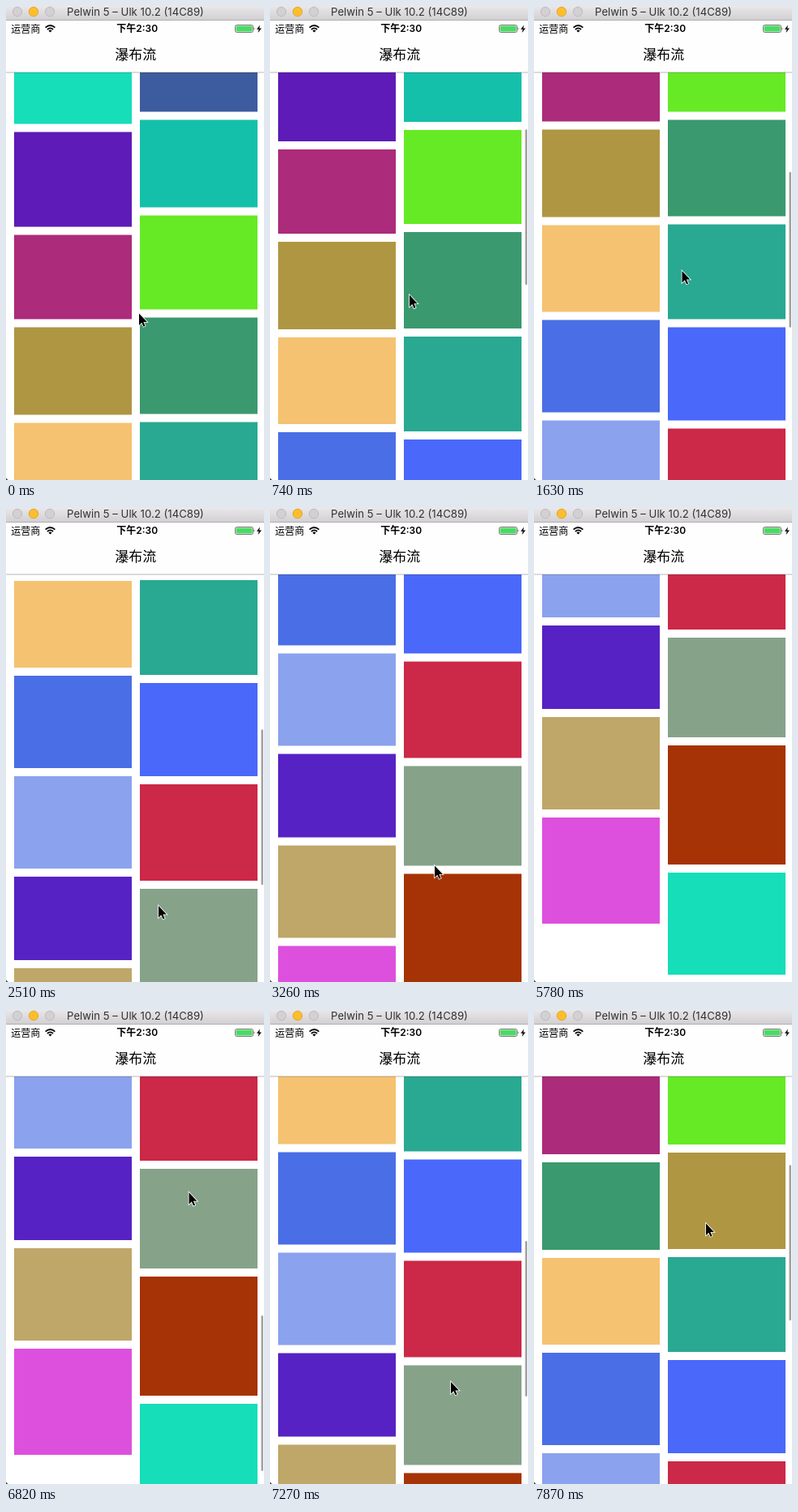
Recreate the animation shown at these times as an HTML page. Size 318 by 585 pixels, loop 8 s.

```html
<!DOCTYPE html>
<html lang="zh">
<head>
<meta charset="utf-8">
<style>
html, body { margin: 0; width: 318px; height: 585px; overflow: hidden; background: #fff; }
svg { display: block; }
text { font-family: Inter, "Noto Sans CJK SC", "Noto Sans CJK", sans-serif; text-anchor: middle; }
</style>
</head>
<body>
<svg width="318" height="585" viewBox="0 0 318 585">
  <defs>
    <linearGradient id="chrome" x2="0" y2="1">
      <stop stop-color="#e9e7e9"/><stop offset="1" stop-color="#d1cfd1"/>
    </linearGradient>
    <clipPath id="view"><rect y="82" width="318" height="503"/></clipPath>
  </defs>
  <rect width="318" height="585" fill="#fff"/>
  <g clip-path="url(#view)"><g id="tiles"></g></g>
  <rect id="bar" x="314.5" width="2.5" height="192" rx="1.25" fill-opacity=".37"/>

  <rect y="18" width="318" height="64" fill="#fefefe"/>
  <rect y="81.5" width="318" height="1" fill-opacity=".28"/>
  <rect width="318" height="17.5" fill="url(#chrome)"/>
  <rect y="17" width="318" height="1" fill="#b1afb1"/>
  <circle cx="14" cy="7" r="5.7" fill="#d2d0d2" stroke="#bebcbe"/>
  <circle cx="34" cy="7" r="5.7" fill="#fdbe2e" stroke="#e3a72c"/>
  <circle cx="54" cy="7" r="5.7" fill="#d2d0d2" stroke="#bebcbe"/>
  <text x="159.5" y="12" font-size="13.2" fill="#333">Pelwin 5 – Ulk 10.2 (14C89)</text>

  <text x="24.3" y="32.5" font-size="12">运营商</text>
  <text x="161.7" y="32.3" font-size="12" font-weight="600">下午2:30</text>
  <text x="159.7" y="66" font-size="17" font-weight="500">瀑布流</text>
  <g fill="none" stroke="#000" stroke-width="1.7">
    <path d="M48.6 26.6Q54.5 21.4 60.4 26.6M50.9 29Q54.5 25.8 58.1 29"/>
    <path d="M52.4 30.4Q54.5 28.6 56.6 30.4L54.5 32.6Z" fill="#000" stroke="none"/>
  </g>
  <rect x="282.5" y="23.5" width="22" height="9" rx="2" fill="#fff" stroke="#555" stroke-width=".8"/>
  <rect x="283.5" y="24.5" width="20" height="7" rx="1" fill="#4cd964"/>
  <path d="M305.7 26.3Q307.4 28 305.7 29.8Z" fill="#333"/>
  <path d="M313 23.5L309 28.7H311.6L310.6 33L315 27.4H312.2Z"/>
  <path d="M0 582Q.5 584.5 3 585H0Z" fill="#333"/>
  <path id="cursor" d="M0 0V14.4L3.3 11.3L5.5 16.3L7.6 15.4L5.4 10.5H9.9Z"
    stroke="#fff" stroke-width="1.6" paint-order="stroke"/>
</svg>
<script>
const LOOP = 8000, STEP = 148.3, GAP = 10, TILE_WIDTH = 145;
const byId = id => document.getElementById(id);

// Tiles from top to bottom: colour and height.
const columns = [
  { top: 45.5, tiles: '#15deb9 100, #5e1bb8 117, #ac2b7b 104, #af9643 108, #f5c271 107, #4a6ee6 114, #8ba3ee 114, #5722c4 103, #bfa769 114, #dd50dd 131' },
  { top: 30.5, tiles: '#3d5c9f 100, #14c0aa 108, #66ea25 116, #3a996e 119, #29a991 117, #4a68fa 115, #cc2848 119, #86a38a 123, #a63305 147, #15deb9 126' }
];

const swipes = [
  { from: 0, to: 11, by: 244 },
  { from: 11, to: 17, by: 180.5 },
  { from: 17, to: 20, by: 151.5 },
  { from: 23, to: 31, by: 158.5 },
  { from: 44.67, to: 53, by: -526 }
];

// Places where the pointer turns: step, x, y.
const turns = [[0, 164, 379.5], [11, 182.5, 327], [17, 188, 491], [20, 195, 340], [22, 203, 441.5],
  [32, 158, 440], [38, 255, 578], [41, 258, 585], [45, 226, 182], [49, 223, 459], [53, 212, 263.5]];

const clamp = v => Math.min(1, Math.max(0, v));
const ease = v => v * v * (3 - 2 * v);
const progress = (from, to, step) => ease(clamp((step - from) / (to - from)));

const scrollAt = step =>
  swipes.reduce((sum, { from, to, by }) => sum + by * progress(from, to, step), 0);

// The scroll bar shows during a swipe and fades over two steps after it.
const barOpacity = step => Math.max(...swipes.map(({ from, to }) =>
  step > from ? clamp(1 - (step - to) / 2) : 0));

function pointerAt(step) {
  const next = Math.max(1, turns.findIndex(turn => turn[0] >= step));
  const [from, x0, y0] = turns[next - 1], [to, x1, y1] = turns[next];
  const k = progress(from, to, step);
  return [x0 + (x1 - x0) * k, y0 + (y1 - y0) * k];
}

const rects = columns.map(({ top, tiles }, i) => tiles.split(', ').map(tile => {
  const [fill, height] = tile.split(' ');
  const rect = document.createElementNS('http://www.w3.org/2000/svg', 'rect');
  const attrs = { x: GAP + i * (TILE_WIDTH + GAP), y: top, width: TILE_WIDTH, height, fill };
  for (const name in attrs) rect.setAttribute(name, attrs[name]);
  byId('tiles').append(rect);
  top += +height + GAP;
  return rect;
}));
const swapped = rects.map(column => column[3]);
const swappedFills = swapped.map(rect => rect.getAttribute('fill'));

function draw(time) {
  const step = Math.min(53, Math.floor((time % LOOP + 18) / STEP));
  const scroll = Math.round(scrollAt(step) * 2) / 2;
  byId('tiles').setAttribute('transform', `translate(0 ${-scroll})`);
  byId('bar').setAttribute('y', 112.3 + scroll * 0.379);
  byId('bar').setAttribute('opacity', barOpacity(step));
  byId('cursor').setAttribute('transform', `translate(${pointerAt(step)})`);
  byId('cursor').setAttribute('visibility', step >= 39 && step < 42 ? 'hidden' : 'visible');

  // Recycled cells come back with their colours exchanged.
  const recycled = step > 30 ? 1 : 0;
  swapped.forEach((rect, i) => rect.setAttribute('fill', swappedFills[i ^ recycled]));
}

const start = performance.now();
function tick() {
  draw(performance.now() - start);
  requestAnimationFrame(tick);
}
tick();
</script>
</body>
</html>
```
